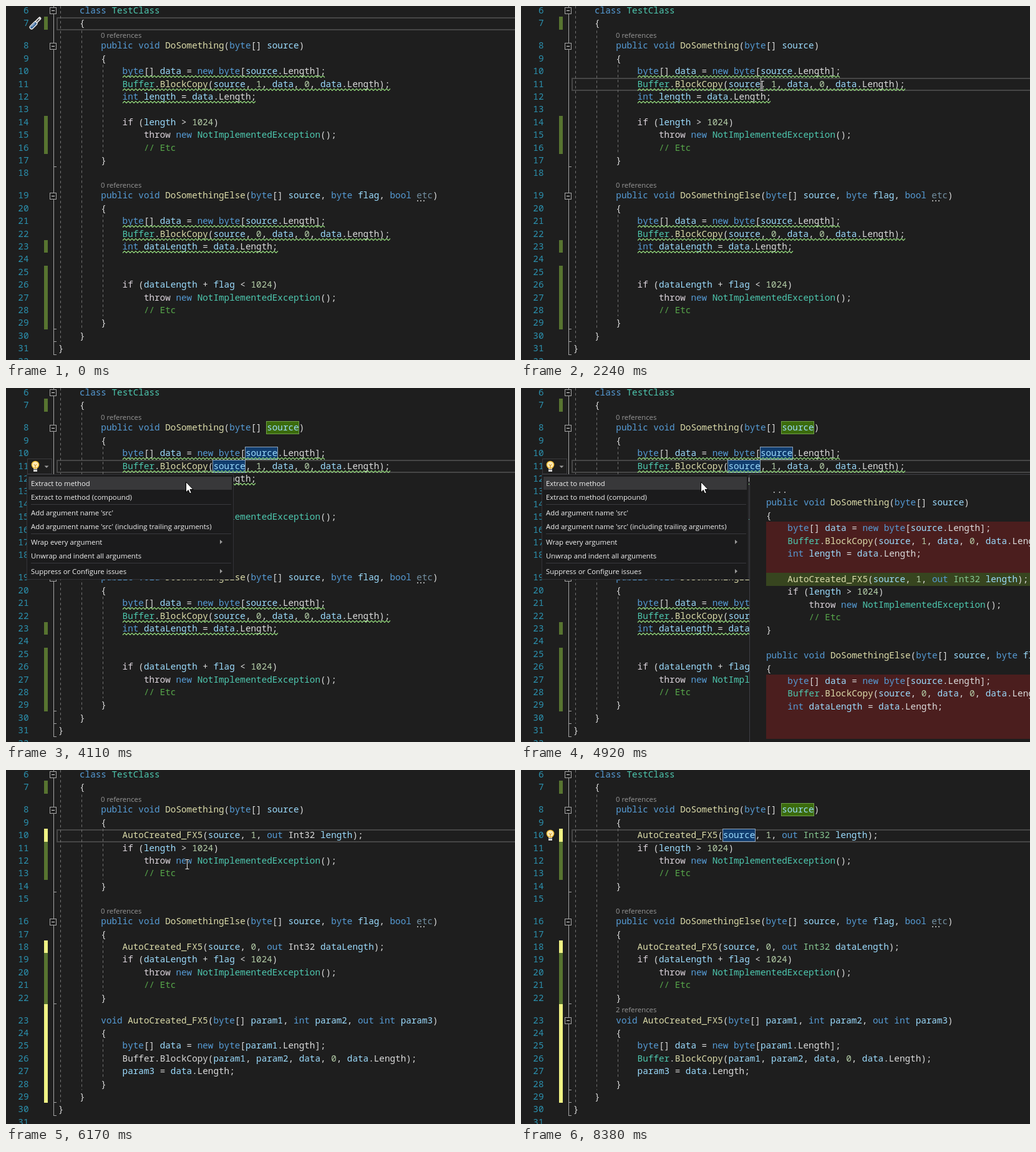
An HTML page with a canvas that plays this animation: 816 px wide and 567 px high, repeating every 8.94 s.

```html
<!DOCTYPE html>
<html lang="en">
<head>
<meta charset="utf-8">
<title>Extract to method</title>
<style>
html, body { margin: 0; width: 100%; height: 100%; overflow: hidden; background: #1e1e1e; }
canvas { display: block; }
</style>
</head>
<body>
<canvas id="stage" width="816" height="567"></canvas>
<script>
const ctx = document.getElementById('stage').getContext('2d');
const LOOP = 8940, CW = 8.577, X0 = 83.7, ROW = 20.4, LENS = 15.6;
const MONO = '500 14.3px "Noto Sans Mono", "DejaVu Sans Mono", monospace';
const UI = '500 11.35px "Open Sans", "Noto Sans", sans-serif';
const TEXT = '#dcdcdc', BLUE = '#569cd6', TEAL = '#4ec9b0', GREEN = '#577430', YELLOW = '#eff284';

const words = s => new Set(s.split(' '));
const keywords = words('class public void byte new int bool out');
const control = words('if throw');
const types = words('TestClass Buffer NotImplementedException');
const methods = words('DoSomething DoSomethingElse BlockCopy AutoCreated_FX5');
const lateWords = words('Buffer BlockCopy Int32');

// A line starting with ~ is a reference count above the next line.
const before = {
  code: `    class TestClass
    {
~0 references
        public void DoSomething(byte[] source)
        {
            byte[] data = new byte[source.Length];
            Buffer.BlockCopy(source, 1, data, 0, data.Length);
            int length = data.Length;

            if (length > 1024)
                throw new NotImplementedException();
                // Etc
        }

~0 references
        public void DoSomethingElse(byte[] source, byte flag, bool etc)
        {
            byte[] data = new byte[source.Length];
            Buffer.BlockCopy(source, 0, data, 0, data.Length);
            int dataLength = data.Length;


            if (dataLength + flag < 1024)
                throw new NotImplementedException();
                // Etc
        }
    }
}
`.split('\n'),
  bars: [[7, 7, GREEN], [14, 16, GREEN], [23, 23, GREEN], [25, 29, GREEN]],
  folds: [6, 8, 19], ends: [17, 29, 30, 31],
  guides: [[0, 6, 30], [4, 8, 29], [8, 10, 16], [8, 21, 28]],
  squiggles: [10, 11, 12, 21, 22, 23],
  refs: [[8, 39], [10, 35], [11, 29]], etcLine: 19
};
const after = {
  code: `    class TestClass
    {
~0 references
        public void DoSomething(byte[] source)
        {
            AutoCreated_FX5(source, 1, out Int32 length);
            if (length > 1024)
                throw new NotImplementedException();
                // Etc
        }

~0 references
        public void DoSomethingElse(byte[] source, byte flag, bool etc)
        {
            AutoCreated_FX5(source, 0, out Int32 dataLength);
            if (dataLength + flag < 1024)
                throw new NotImplementedException();
                // Etc
        }
~2 references
        void AutoCreated_FX5(byte[] param1, int param2, out int param3)
        {
            byte[] data = new byte[param1.Length];
            Buffer.BlockCopy(param1, param2, data, 0, data.Length);
            param3 = data.Length;
        }
    }
}
`.split('\n'),
  bars: [[7, 7, GREEN], [10, 10, YELLOW], [11, 13, GREEN], [18, 18, YELLOW], [19, 22, GREEN], [23, 29, YELLOW]],
  folds: [6, 8, 16], ends: [14, 22, 29, 30],
  guides: [[0, 6, 29], [4, 8, 28], [8, 10, 13], [8, 18, 21], [8, 25, 27]],
  squiggles: [],
  refs: [[8, 39], [10, 28]], etcLine: 16
};

function layout(doc) {
  doc.y = {};
  doc.lens = [];
  doc.lines = {};
  let y = 7 - ROW, n = 5;
  for (const line of doc.code) {
    if (line[0] === '~') {
      y += LENS;
      doc.lens.push([line.slice(1), y + 8]);
    } else {
      doc.y[++n] = y += ROW;
      doc.lines[n] = line;
    }
  }
}
layout(before);
layout(after);

// Change preview: first character marks removed, added or kept lines.
const preview = ['  ...', ' ' + before.lines[8].slice(8), ' {',
  ...[10, 11, 12, 13].map(n => '-' + before.lines[n].slice(8)),
  '+' + after.lines[10].slice(8),
  ...[14, 15, 16, 17, 18, 19, 20].map(n => ' ' + before.lines[n].slice(8)),
  ...[21, 22, 23, 24, 25].map(n => '-' + before.lines[n].slice(8))];

const path = [
  [980, 822, 506], [1480, 389, 139], [1920, 389, 139], [2040, 386, 128], [2490, 386, 128],
  [2800, 416, 146], [3240, 416, 146], [3550, 288, 150], [5420, 288, 150], [5480, 290, 151],
  [6540, 290, 151], [6980, 291, 187], [7430, 291, 187], [8380, 802, -12]
];

function mouseAt(t) {
  const i = path.findIndex(p => p[0] > t);
  if (i < 1) return null;
  const [ta, xa, ya] = path[i - 1], [tb, xb, yb] = path[i];
  let k = (t - ta) / (tb - ta);
  k = k * k * (3 - 2 * k);
  return [xa + (xb - xa) * k, ya + (yb - ya) * k];
}

function rect(x, y, w, h, fill, stroke) {
  if (fill) { ctx.fillStyle = fill; ctx.fillRect(x, y, w, h); }
  if (stroke) { ctx.strokeStyle = stroke; ctx.lineWidth = 1; ctx.strokeRect(x + .5, y + .5, w - 1, h - 1); }
}
function line(points, color, width = 1) {
  ctx.beginPath();
  points.forEach(p => ctx.lineTo(...p));
  ctx.strokeStyle = color;
  ctx.lineWidth = width;
  ctx.stroke();
}
function shape(points, fill, stroke) {
  ctx.beginPath();
  points.forEach(p => ctx.lineTo(...p));
  ctx.closePath();
  ctx.fillStyle = fill;
  ctx.fill();
  if (stroke) { ctx.strokeStyle = stroke; ctx.lineWidth = 1; ctx.stroke(); }
}
function disc(x, y, r, fill) {
  ctx.beginPath();
  ctx.arc(x, y, r, 0, 7);
  ctx.fillStyle = fill;
  ctx.fill();
}
// Text made of alternating strings and colours.
function label(x, y, ...runs) {
  ctx.font = UI;
  for (let i = 0; i < runs.length; i += 2) {
    ctx.fillStyle = runs[i + 1];
    ctx.fillText(runs[i], x, Math.round(y));
    x += ctx.measureText(runs[i]).width;
  }
}

function tokenColor(w, plain) {
  if (w.startsWith('//')) return '#57a64a';
  if (plain && lateWords.has(w)) return TEXT;
  if (keywords.has(w)) return BLUE;
  if (control.has(w)) return '#dcd4dc';
  if (types.has(w)) return TEAL;
  if (methods.has(w)) return '#dcdcaa';
  if (w === 'Int32') return '#86c691';
  if (w === 'etc') return '#7390a2';
  if (/^\d/.test(w)) return '#b5cea8';
  return /^[a-z]/.test(w) ? '#9cdcfe' : TEXT;
}
function codeLine(text, x, y, plain) {
  ctx.font = MONO;
  for (const m of text.matchAll(/\/\/.*|\w+|\S/g)) {
    ctx.fillStyle = tokenColor(m[0], plain);
    ctx.fillText(m[0], x + m.index * CW, Math.round(y + 5));
  }
}

function squiggle(x, end, y) {
  const pts = [];
  for (let i = 0; x + i * 3 <= end; i++) pts.push([x + i * 3, y + (i % 2 ? 0 : 3)]);
  line(pts, '#95db7d', 1.2);
}
function foldBox(y) {
  y = Math.round(y + .4) - 5;
  rect(70, y, 11, 11, '#1e1e1e', '#a5a5a5');
  rect(73, y + 5, 5, 1, '#e0e0e0');
}

function editor(doc, current, marked, plain, resolved) {
  const Y = doc.y, first = Math.round(Y[current] - 9.4);
  ctx.strokeStyle = '#464646';
  ctx.lineWidth = 2;
  ctx.strokeRect(82, first + 1, 760, 19);

  for (const [a, b, color] of doc.bars) {
    const top = Math.round(Y[a - 1] + 10.4);
    rect(61, top, 6, Math.round(Y[b] + 10.4) - top, color);
  }
  ctx.setLineDash([4, 4]);
  for (const [col, a, b] of doc.guides) {
    const x = Math.round(X0 + col * CW) + 3.5;
    line([[x, a === 6 ? 0 : Y[a] - (a === 8 ? 24 : 10)], [x, Y[b] + 10]], '#707070');
  }
  ctx.setLineDash([]);

  const last = Math.round(Y[doc.ends.at(-1)] + 10);
  rect(76, 0, 1, last, '#a5a5a5');
  const ends = resolved ? [...doc.ends, 28] : doc.ends;
  const folds = resolved ? [...doc.folds, 23] : doc.folds;
  ends.forEach(n => rect(76, Math.round(Y[n] + 9.5), 5, 1, '#a5a5a5'));
  folds.forEach(n => foldBox(Y[n]));

  if (marked) for (const [n, col] of doc.refs) {
    const def = n === 8;
    rect(Math.round(X0 + col * CW) - 1, Math.round(Y[n]) - 10, 53, 21,
      def ? '#3b6b0c' : '#113d6f', def ? '#70a048' : '#8fa6bd');
  }

  for (const n in doc.lines) {
    ctx.font = MONO;
    ctx.fillStyle = '#2b91af';
    ctx.textAlign = 'right';
    ctx.fillText(n, 36.5, Math.round(Y[n] + 5));
    ctx.textAlign = 'left';
    codeLine(doc.lines[n], X0, Y[n], plain);
  }
  doc.lens.forEach(([text, y], i) => { if (i < 2 || resolved) label(152, y, text, '#999'); });
  for (const n of doc.squiggles) squiggle(187, X0 + doc.lines[n].length * CW + 1, Math.round(Y[n]) + 7.5);
  for (let i = 0; i < 3; i++) rect(659 + i * 5, Math.round(Y[doc.etcLine]) + 8, 2, 2, '#a5a5a5');
}

function bulb(x, y) {
  rect(x - 3, y + 3, 6, 6, '#d8d8d8');
  rect(x - 3, y + 5, 6, 1, '#555');
  disc(x, y - 2, 6.3, '#f2bd35');
  disc(x, y - 2, 4.8, '#ffecb8');
  line([[x - 2, y - 3], [x, y], [x + 2, y - 3]], '#c98a1a');
  line([[x, y], [x, y + 3]], '#c98a1a');
}
function bulbButton(x, y, w, h, bx) {
  rect(x, y, w, h, '#1e1e1e', '#3a3a3d');
  bulb(bx, y + h / 2 - .5);
  const ax = x + w - 9, ay = y + h / 2;
  shape([[ax - 3.5, ay - 1], [ax + 3.5, ay - 1], [ax, ay + 2.5]], '#999');
}

function screwdriver() {
  ctx.lineCap = 'round';
  line([[54, 20], [47, 27]], '#e6e6e6', 5);
  line([[53, 21], [48, 26]], '#333', 1.5);
  line([[47, 28], [41, 34]], '#e6e6e6', 7);
  line([[47, 28], [41, 34]], '#39679a', 4);
  line([[46, 28], [41, 33]], '#dce8f4', 1);
  ctx.lineCap = 'butt';
}

function tooltip() {
  rect(387, 156, 440, 182, '#424245', '#4d4d50');
  line([[402, 179], [409, 172]], '#e0e0e0', 3);
  disc(410, 171, 4, '#e0e0e0');
  shape([[409, 172], [411, 166], [415, 170]], '#424245');
  const white = '#f1f1f1', link = '#3399ff';
  label(420, 177, 'int ', BLUE, 'Array', TEAL, '.Length { ', white, 'get', BLUE, '; }', white);
  label(400, 193, 'Gets the total number of elements in all the dimensions of the ', white, 'Array', TEAL, '.', white);
  label(400, 218, 'Returns:', white);
  label(406, 233, 'The total number of elements in all the dimensions of the ', white, 'Array', TEAL,
    '; zero if there are no elements.', white);
  label(400, 258, 'Exceptions:', white);
  label(406, 273, 'OverflowException', TEAL);
  label(400, 302, 'EchoGardener: DRY violation, can be extracted into method.', white);
  label(400, 329, 'Show potential fixes', link, ' (Alt+Enter or Ctrl+.)', white);
}

const menuItems = [
  ['Extract to method', 153], ['Extract to method (compound)', 175],
  ["Add argument name 'src'", 200], ["Add argument name 'src' (including trailing arguments)", 222],
  ['Wrap every argument', 247, true], ['Unwrap and indent all arguments', 269],
  ['Suppress or Configure issues', 294, true]
];
function menu() {
  rect(33, 138, 332, 169, '#1b1b1c', '#333337');
  rect(36, 142, 326, 21, '#38383a');
  [186, 233, 280].forEach(y => rect(40, y, 321, 1, '#39393d'));
  for (const [text, y, sub] of menuItems) {
    label(40, y + 4, text, '#f1f1f1');
    if (sub) shape([[343, y - 4], [347, y - .5], [343, y + 3]], '#999');
  }
}
function previewPane(plain) {
  rect(366, 138, 460, 440, '#1e1e1e', '#3f3f46');
  preview.forEach((row, i) => {
    const y = 163 + i * ROW;
    if (row[0] !== ' ') rect(393, Math.round(y - 10), 430, 21, row[0] === '-' ? '#4b1e1e' : '#37451f');
    codeLine(row.slice(1), 393, y, plain);
  });
}

function ibeam(x, y) {
  x = Math.round(x) + .5;
  y = Math.round(y);
  for (const [color, w] of [['#1e1e1e', 3], ['#e8e8e8', 1]]) {
    line([[x, y - 7], [x, y + 7]], color, w);
    line([[x - 3, y - 7.5], [x + 3, y - 7.5]], color, w);
    line([[x - 3, y + 7.5], [x + 3, y + 7.5]], color, w);
  }
}
function arrow(x, y) {
  const outline = [[0, 0], [0, 16.5], [3.8, 13], [6.2, 18.5], [8.8, 17.4], [6.5, 12], [11.5, 12]];
  shape(outline.map(([a, b]) => [x + a + .5, y + b + .5]), '#fff', '#000');
}

function draw(t) {
  const within = (a, b) => t >= a && t < b;
  rect(0, 0, 816, 567, '#1e1e1e');
  const done = t >= 5610, resolved = t >= 7690;
  if (done) editor(after, 10, t >= 6600, !resolved, resolved);
  else editor(before, t < 2060 ? 7 : 11, t >= 2490, false, false);

  if (within(2060, 2600)) rect(384, 116, 1, 19, TEXT);
  if (within(5610, 6170) || within(6700, 7300) || within(7830, 8380)) rect(375, 94, 2, 20, TEXT);

  if (t < 1050) screwdriver();
  if (within(1670, 2060)) {
    bulbButton(344, 156, 33, 22, 355);
    tooltip();
  }
  if (within(2800, 5420)) {
    bulbButton(34, 113, 40, 25, 47);
    menu();
    if (t >= 4180) previewPane(t < 4920);
  }
  if (within(2600, 2800) || within(5420, 5610)) bulb(47, 125);
  if (t >= 6800) bulb(47, 104);

  const mouse = mouseAt(t);
  if (mouse) (within(2740, 5420) ? arrow : ibeam)(...mouse);
}

function tick(now) {
  draw(now % LOOP);
  requestAnimationFrame(tick);
}
requestAnimationFrame(tick);
</script>
</body>
</html>
```
